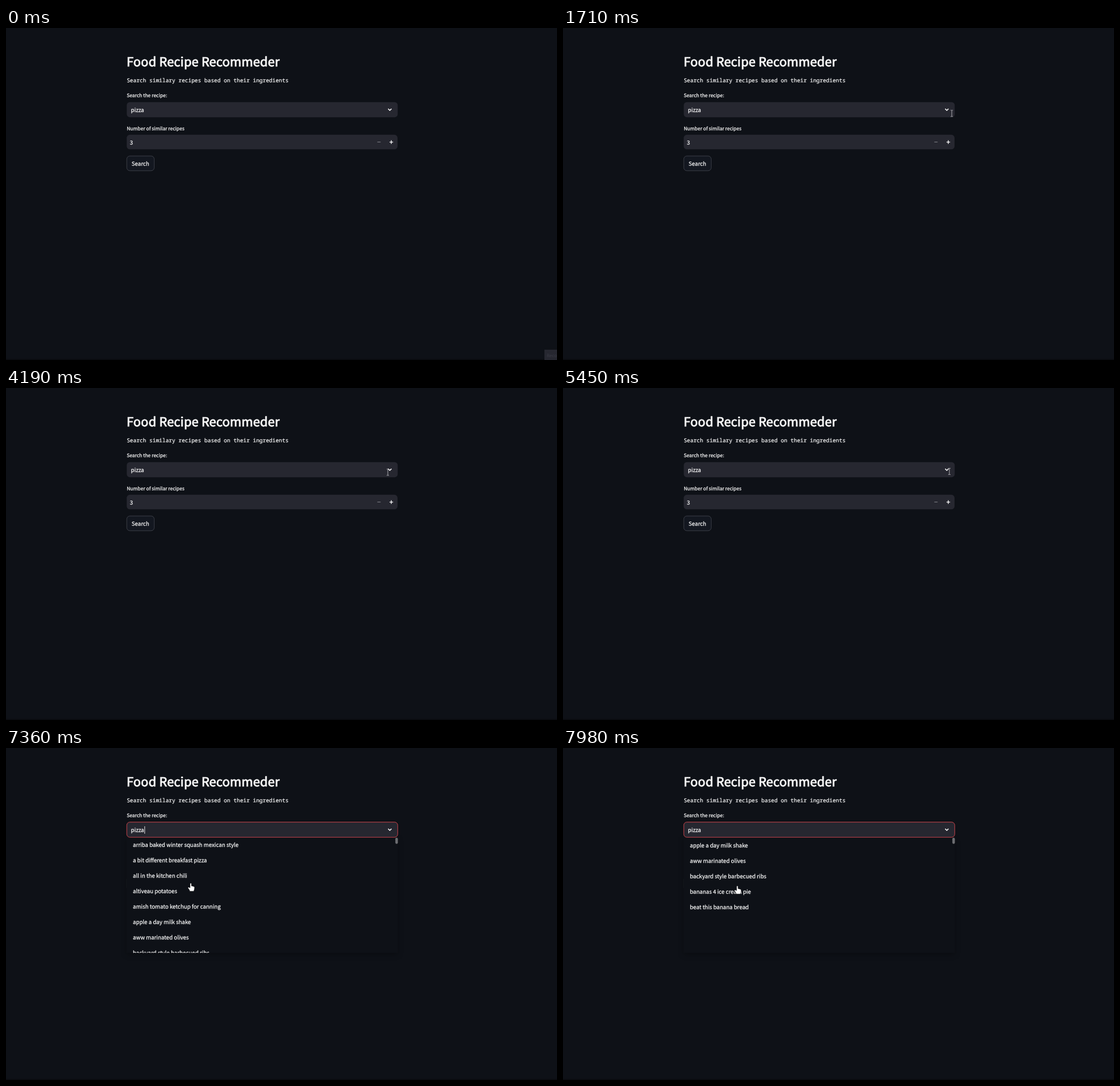
An HTML page for the animation above (8 s loop, 964 px wide and 581 px high).

```html
<!DOCTYPE html>
<html lang="en">
<head>
<meta charset="utf-8">
<title>Food Recipe Recommeder</title>
<style>
  html, body { margin: 0; width: 100%; height: 100%; overflow: hidden; background: #0e1117; }
  svg { display: block; width: 964px; height: 581px; }
  text {
    font: 400 9.64px "Noto Sans CJK JP", "Noto Sans CJK SC", "Noto Sans", sans-serif;
    fill: #fafafa; stroke: #fafafa; stroke-width: .25px;
    text-rendering: geometricPrecision; white-space: pre;
  }
  .title { font-size: 21.7px; stroke-width: .9px; letter-spacing: .15px; }
  .mono { font: 500 9.45px "Noto Sans Mono", "DejaVu Sans Mono", monospace; stroke-width: .2px; }
  .label { font-size: 8.46px; }
  .tip { font: 7.8px "Open Sans", sans-serif; fill: #575757; stroke: none; }
  .field { fill: #262730; }
  .line { fill: none; stroke: #fafafa; }
</style>
</head>
<body>
<svg viewBox="0 0 964 581">
  <defs>
    <clipPath id="listClip"><rect x="211" y="157" width="474.5" height="201.5"/></clipPath>
    <filter id="shadow" x="-10%" y="-10%" width="120%" height="125%" color-interpolation-filters="sRGB">
      <feDropShadow dx="0" dy="2.7" stdDeviation="5" flood-color="#000" flood-opacity=".3"/>
    </filter>
  </defs>
  <rect width="964" height="581" fill="#0e1117"/>
  <rect y="579.5" width="964" height="1.5" fill="#090b0f"/>

  <text class="title" x="211" y="67">Food Recipe Recommeder</text>
  <text class="mono" x="211.2" y="95">Search similary recipes based on their ingredients</text>
  <text class="label" x="211.2" y="121.2">Search the recipe:</text>

  <text class="label" x="211.2" y="178.6">Number of similar recipes</text>
  <rect class="field" x="211.2" y="186.8" width="473.8" height="25.5" rx="5.4"/>
  <text x="216.8" y="203.6">3</text>
  <path class="line" d="M649.7 199.6h5.6" style="stroke:#85868b"/>
  <path class="line" d="M671 199.6h6.2M674.1 196.5v6.2" stroke-width="1.4"/>
  <rect x="211.3" y="224" width="48" height="25.8" rx="5.4" fill="#131720" stroke="#41444c" stroke-width=".9"/>
  <text x="219.8" y="240.6">Search</text>

  <g id="list">
    <rect x="211" y="157" width="474.5" height="201.5" fill="#0e1117" filter="url(#shadow)"/>
    <g clip-path="url(#listClip)"><g id="rows"></g></g>
    <rect id="thumb" x="681.2" y="157" width="4.4" height="10.8" rx="2.2" fill="#6d6e72"/>
  </g>

  <rect id="select" class="field" x="211.3" y="129.7" width="474" height="26.5" rx="5.4"/>
  <text x="218.6" y="147">pizza</text>
  <path id="caret" class="line" d="M242.7 137v13" stroke-width=".9"/>
  <path class="line" d="M668.6 141.4l2.9 2.9l2.9-2.9" stroke-width="1.5"/>

  <g id="badge">
    <rect x="942" y="563" width="22" height="18" fill="#262730"/>
    <text class="tip" x="946" y="576" style="fill:#3c3d47">Recor</text>
  </g>
  <g id="tip">
    <rect x="681" y="154.3" width="28" height="15.8" fill="#fff" stroke="#8a8a8a" stroke-width=".5"/>
    <text class="tip" x="685.7" y="165.2">open</text>
  </g>

  <g id="cursor">
    <path id="arrow" d="M0 0v10.4l2.4-2.2l1.6 3.5l1.5-.7l-1.5-3.4h3.2z" fill="#fff" stroke="#000" stroke-width=".5"/>
    <path id="beam" d="M-2-5.5h1.4l.6.5l.6-.5h1.4M0-5v10M-2 5.5h1.4l.6-.5l.6.5h1.4" fill="none" stroke="#cfcfd2" stroke-width=".8"/>
    <path id="hand" d="M-1.2.6Q0-.9 1.2.6V4.6L5.6 5.8Q6.8 6.2 6.7 7.6L6.2 11L5.2 14H-1.6L-2.4 11.8L-5 8Q-4.4 6-1.2 8z" fill="#fff" stroke="#000" stroke-width=".5"/>
  </g>
</svg>
<script>
const LOOP = 8000, ROW = 27, WHEEL = 67.3;
const $ = id => document.getElementById(id);
const recipes = [
  "arriba baked winter squash mexican style", "a bit different breakfast pizza",
  "all in the kitchen chili", "altiveau potatoes", "amish tomato ketchup for canning",
  "apple a day milk shake", "aww marinated olives", "backyard style barbecued ribs",
  "bananas 4 ice cream pie", "beat this banana bread"
];
$("rows").innerHTML = recipes.map((name, i) =>
  `<text x="222" y="${173.2 + i * ROW}">${name}</text>`).join("");

const progress = (t, from, to) => Math.min(1, Math.max(0, (t - from) / (to - from)));
const easeOut = p => 1 - (1 - p) ** 3;
const smooth = p => p * p * (3 - 2 * p);
const within = (v, a, b) => v >= a && v < b;
const show = (id, on) => { $(id).style.display = on ? "" : "none"; };

// Each glide eases the pointer on to a new resting place.
const glides = [
  { from: 70, to: 520, x: 758, y: 419 },
  { from: 720, to: 1500, x: 702, y: 168 },
  { from: 1500, to: 1980, x: 675.5, y: 145.5 },
  { from: 3499, to: 3500, x: 675.2, y: 151.2 },
  { from: 3500, to: 3900, x: 674, y: 200 },
  { from: 3900, to: 4260, x: 668, y: 147 },
  { from: 4260, to: 4590, x: 676, y: 146 },
  { from: 5450, to: 5810, x: 673.6, y: 143.5 },
  { from: 6880, to: 7640, x: 305, y: 241.5 }
];
function pointer(t) {
  let x = 980, y = 600;
  for (const g of glides) {
    const p = easeOut(progress(t, g.from, g.to));
    x += (g.x - x) * p;
    y += (g.y - y) * p;
  }
  return [x, y];
}

// Two turns of the wheel
const scroll = t => WHEEL * (smooth(progress(t, 7570, 7710)) + smooth(progress(t, 7840, 7980)));

function render(t) {
  const [x, y] = pointer(t);
  const open = t >= 6540, focused = t >= 6080;
  const overSelect = x < 686 && within(y, 129, 157);
  const overList = open && x < 686 && y >= 157;
  const overStep = !open && within(x, 663, 686) && within(y, 187, 212);

  $("cursor").setAttribute("transform", `translate(${x} ${y})`);
  show("beam", overSelect);
  show("hand", overList || overStep);
  show("arrow", !overSelect && !overList && !overStep);

  show("badge", t < 70);
  show("list", open);
  $("list").style.opacity = t < 6610 ? .97 : 1;
  show("thumb", overList);
  $("rows").setAttribute("transform", `translate(0 ${-scroll(t)})`);
  $("select").style.stroke = focused ? "#c8434a" : "none";
  show("caret", focused && (t - 6080) % 1040 < 520);
  show("tip", within(t, 2900, 3570) || within(t, 6540, 6880));
  $("tip").setAttribute("transform", open ? "translate(-1.5 -.7)" : "");
}

const start = performance.now();
function frame() {
  render((performance.now() - start) % LOOP);
  requestAnimationFrame(frame);
}
render(0);
requestAnimationFrame(frame);
</script>
</body>
</html>
```
